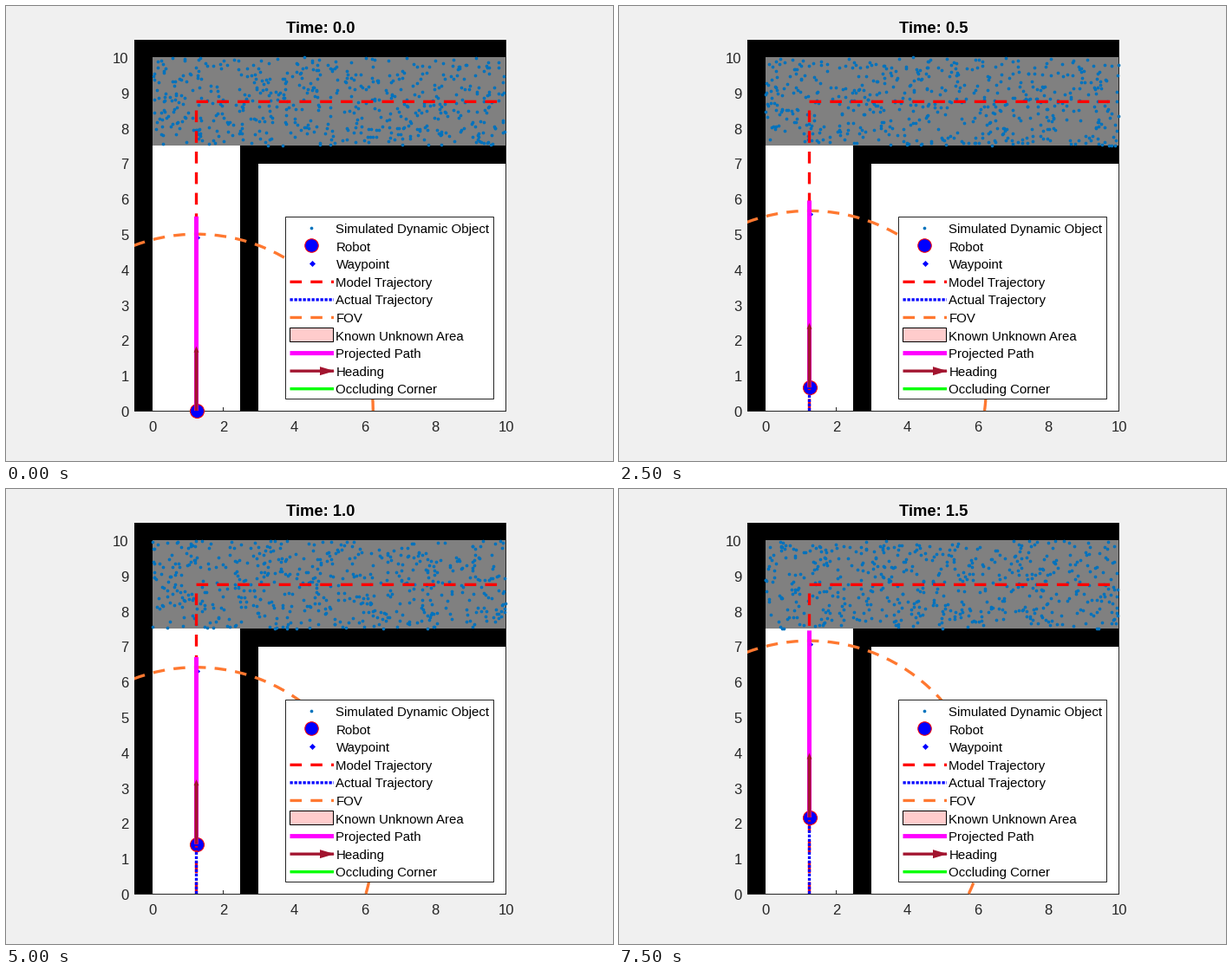
A matplotlib script for the animation above (8 s loop, 700 by 525 pixels).

```python
import numpy as np
import matplotlib.pyplot as plt
from matplotlib.animation import FuncAnimation
from matplotlib.patches import Polygon, Rectangle

plt.rcParams["font.family"] = "Liberation Sans"
plt.rcParams["lines.scale_dashes"] = False
plt.rcParams["path.simplify"] = False
plt.rcParams["path.snap"] = False

W, H, DPI = 700, 525, 100
FRAMES, INTERVAL = 16, 500
PX = 72 / DPI                      # points per pixel
UNIT = 40.76                       # pixels per metre
RED, BLUE, ORANGE = "#ff0000", "#0000ff", "#ff7830"
MAGENTA, MAROON, DOT = "#ff00ff", "#a2142f", "#0072bd"
INK = "#262626"
DASH, DOTS = (13.6, 10.18), (3.3, 1.7)
LANE, REACH = 1.25, 5.0

fig = plt.figure(figsize=(W / DPI, H / DPI), dpi=DPI, facecolor="#f0f0f0")
ax = fig.add_axes([0, 0, 1, 1])
ax.set_xlim(0, W)
ax.set_ylim(H, 0)
ax.axis("off")


def X(x):
    return 168.57 + UNIT * np.asarray(x, float)


def Y(y):
    return 467 - UNIT * np.asarray(y, float)


def box(x0, y0, x1, y1, color, z=1):
    left, right = np.round(X([x0, x1]))
    bottom, top = np.round(Y([y0, y1]))
    ax.add_patch(Rectangle((left, top), right - left, bottom - top,
                           fc=color, ec="none", zorder=z))


def line(x, y, color, width, dash=None, z=5, **kw):
    style = (0, [d * PX for d in dash]) if dash else "-"
    return ax.plot(x, y, color=color, lw=width * PX, ls=style, zorder=z,
                   solid_capstyle="butt", dash_capstyle="butt", **kw)[0]


def mark(x, y, shape, size, fill, edge="none", z=5):
    return ax.plot(x, y, ls="none", marker=shape, ms=size * PX, mfc=fill,
                   mec=edge, mew=PX, zorder=z)[0]


def label(x, y, text, size, color=INK, **kw):
    return ax.text(x, y, text, fontsize=size * PX, color=color,
                   va="baseline", zorder=30, **kw)


# Floor plan
box(-0.5, 0, 10, 10.5, "white")
line([250.5, 250.5], [463, 467], INK, 1, z=1.5)
box(-0.5, 0, 0, 10.5, "black", 2)
box(-0.5, 10, 10, 10.5, "black", 2)
box(2.5, 0, 10, 7.5, "black", 2)
box(3, 0, 10, 7, "white", 2.1)
box(0, 7.5, 10, 10, "#808080", 2)
line([148, 577], [467.5, 467.5], INK, 1, z=2.5)
line([576.5, 576.5], [39, 468], INK, 1, z=2.5)

for v in range(0, 11, 2):
    label(X(v) + 0.4, 491, str(v), 16.67, ha="center")
for v in range(11):
    label(141.5, Y(v) + 6.8, str(v), 16.67, ha="right")
title = label(362.5, 31, "", 18.33, "black", ha="center", weight="bold")

# Drifting objects that bounce inside the corridor
N = 550
rng = np.random.default_rng(7)
start = rng.uniform(0, 1, (N, 2)) * [10, 2.5]
angle = rng.uniform(0, 2 * np.pi, N)
speed = rng.uniform(0.3, 1.5, N)
drift = np.column_stack([np.cos(angle), np.sin(angle)]) * speed[:, None]


def fold(p, size):
    p = np.mod(p, 2 * size)
    return np.where(p > size, 2 * size - p, p)


objects = mark([], [], "o", 3.7, DOT, z=3)

# Moving parts
view = Rectangle((148, 39), 429, 429, transform=ax.transData)
robot = mark([], [], "o", 16, BLUE, RED, z=4)
waypoint = mark([], [], "D", 5, BLUE, z=4.5)
line(X([LANE, LANE, 10]), Y([0, 8.75, 8.75]), RED, 3.33, DASH, z=4.6)
trail = line([], [], BLUE, 3.33, DOTS, z=4.7)
arcs = [line([], [], ORANGE, 3.33, DASH, z=4.8) for _ in range(2)]
for arc in arcs:
    arc.set_clip_path(view)
path = line([], [], MAGENTA, 5, z=6)
heading = line([], [], MAROON, 4, z=7)
tip = ax.add_patch(Polygon([(0, 0)] * 3, fc=MAROON, ec="none", zorder=7))

# Legend
ax.add_patch(Rectangle((322.5, 243.5), 240, 210, fc="white", ec=INK,
                       lw=PX, zorder=20))
NAMES = ["Simulated Dynamic Object", "Robot", "Waypoint", "Model Trajectory",
         "Actual Trajectory", "FOV", "Known Unknown Area", "Projected Path",
         "Heading", "Occluding Corner"]
rows = [256.2 + 20.57 * i for i in range(len(NAMES))]
for name, row in zip(NAMES, rows):
    label(380.5, row + 6, name, 15, "black")
mark(352, rows[0], "o", 3.7, DOT, z=25)
mark(352, rows[1] - 0.5, "o", 15.5, BLUE, RED, z=25)
mark(352.5, rows[2], "D", 5, BLUE, z=25)
for i, color, width, dash in [(3, RED, 3.33, DASH), (4, BLUE, 3.33, DOTS),
                              (5, ORANGE, 3.33, DASH), (7, MAGENTA, 5, None),
                              (8, MAROON, 3.33, None),
                              (9, "#00ff00", 3.33, None)]:
    line([327.5, 378], [rows[i] + 0.4] * 2, color, width, dash, z=25)
ax.add_patch(Rectangle((327.5, 371.5), 50, 16, fc="#ffcccc", ec="black",
                       lw=PX, zorder=25))
r = rows[8] + 0.4
ax.add_patch(Polygon([(362, r - 5), (379, r), (362, r + 5)], fc=MAROON,
                     ec="none", zorder=25))


def place(k):
    t = k / 10
    y = [0, 0.06][k] if k < 2 else 1.5 * t - 0.09
    title.set_text(f"Time: {t:.1f}")

    p = start + drift * t
    objects.set_data(X(fold(p[:, 0], 10)), Y(7.5 + fold(p[:, 1], 2.5)))

    x = X([LANE, LANE])
    robot.set_data(x[:1], Y([y]))
    waypoint.set_data(x[:1], Y([y + 4.9]))
    trail.set_data(x, Y([0, y]))
    path.set_data(x, Y([y, max(5.5, y + 5.29)]))
    top = float(Y(y + 1.8))
    heading.set_data(x, [float(Y(y)), top + 4])
    tip.set_xy([(x[0] - 3, top + 6), (x[0], top - 1), (x[0] + 3, top + 6)])

    # The sweep stops just short of a full turn
    enter = 2 * np.pi - np.arcsin(y / REACH)
    tail = np.linspace(enter, 6.25, 12) if enter < 6.25 else np.array([])
    for arc, a in zip(arcs, (np.arange(0, 3.2, 0.05), tail)):
        arc.set_data(X(LANE + REACH * np.cos(a)), Y(y + REACH * np.sin(a)))
    return ()


anim = FuncAnimation(fig, place, frames=FRAMES, interval=INTERVAL,
                     repeat=True, repeat_delay=0, blit=False)
plt.show()
```
